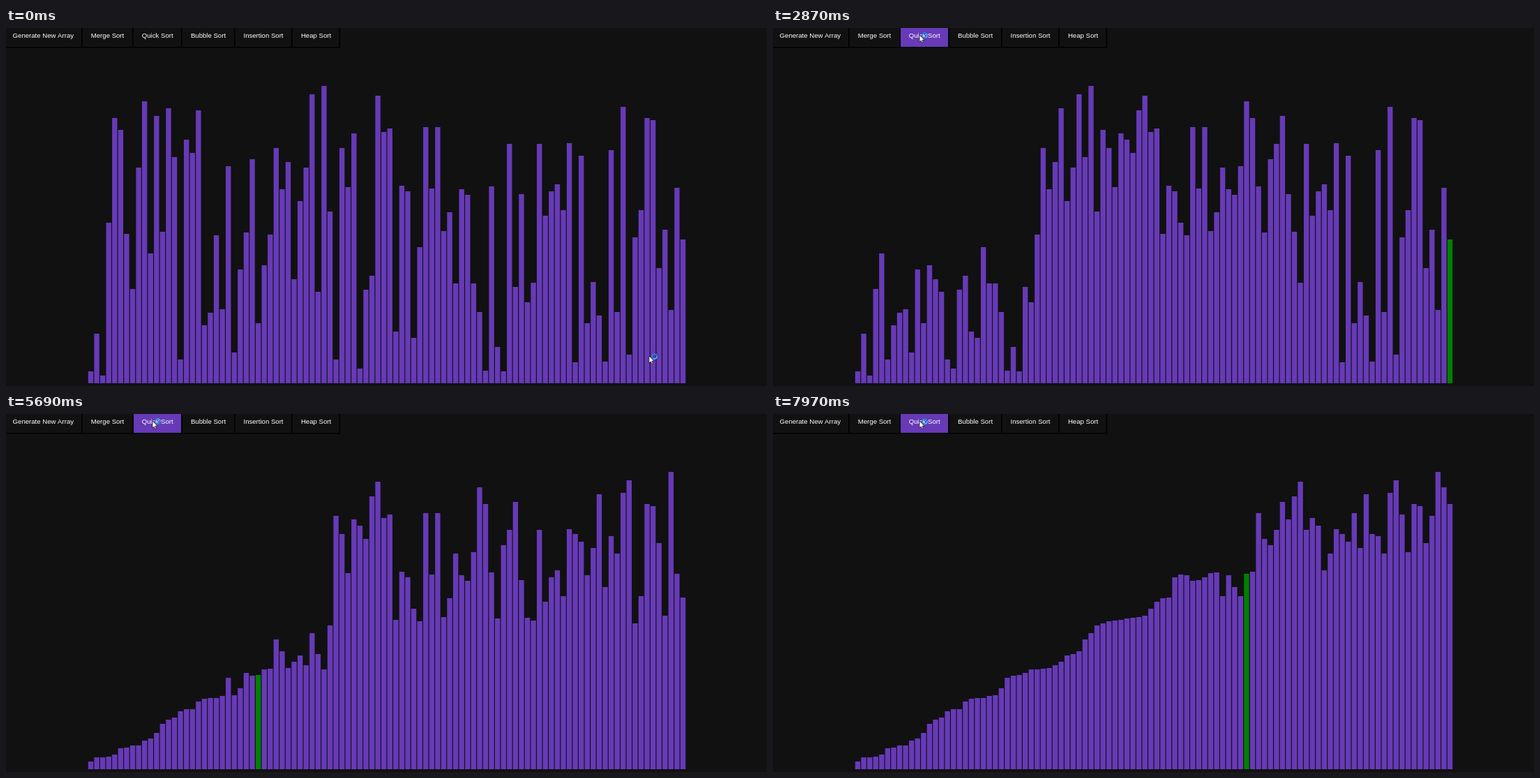
Animation of 1091x513 px, one loop 8 s. Source, as an HTML page with a canvas:

```html
<!DOCTYPE html>
<html lang="en">
<head>
<meta charset="utf-8">
<title>Quick sort</title>
<style>
html, body { margin: 0; width: 100%; height: 100%; overflow: hidden; background: #111; }
canvas { display: block; }
</style>
</head>
<body>
<canvas width="1091" height="513"></canvas>
<script>
const ctx = document.querySelector('canvas').getContext('2d');
const LOOP = 8000, FLOOR = 509, PURPLE = '#673ab7';

// Top edge of each bar before sorting
const tops = [
  492, 438, 498, 279, 129, 146, 295, 374, 200, 105, 323, 126, 292, 115, 185, 475, 160, 179, 118, 426,
  408, 297, 403, 198, 465, 346, 293, 188, 423, 340, 296, 172, 231, 192, 360, 248, 200, 95, 378, 83,
  263, 475, 172, 228, 151, 488, 375, 355, 97, 149, 144, 435, 226, 234, 444, 314, 142, 230, 142, 291,
  264, 366, 231, 239, 366, 407, 491, 227, 457, 492, 166, 371, 238, 393, 365, 166, 269, 234, 224, 261,
  165, 479, 183, 423, 364, 412, 478, 175, 407, 113, 468, 300, 261, 129, 132, 344, 289, 404, 229, 303
];

const buttons = [
  ['Generate New Array', 0, 108, 53.3],
  ['Merge Sort', 110, 181, 145.5],
  ['Quick Sort', 183, 251, 217.2],
  ['Bubble Sort', 253, 327, 290],
  ['Insertion Sort', 329, 409, 369],
  ['Heap Sort', 411, 477.5, 444.5]
];

const swap = (list, a, b) => { [list[a], list[b]] = [list[b], list[a]]; };

// Every swap of a last-pivot quick sort, in order
const swaps = [];
function quickSort(list, lo, hi) {
  if (lo >= hi) return;
  let i = lo;
  const step = (j, last) => {
    swaps.push({ a: i, b: j, pivot: hi, last });
    swap(list, i, j);
  };
  for (let j = lo; j < hi; j++) {
    if (list[j] > list[hi]) { step(j, false); i++; }
  }
  step(hi, true);
  quickSort(list, lo, i - 1);
  quickSort(list, i + 1, hi);
}
quickSort([...tops], 0, tops.length - 1);

// [time, swaps made]
const pace = [[1990, 0], [2870, 29.75], [3330, 46.25], [4710, 92.75], [6560, 152.75], [7970, 199.75], [8000, 200.75]];
// [time, x, y]
const path = [[0, 922, 470], [870, 220, 27], [1100, 210, 10]];

const smooth = p => p * p * (3 - 2 * p);

function along(keys, t, ease = p => p) {
  if (t <= keys[0][0]) return keys[0].slice(1);
  const n = keys.findIndex(k => k[0] > t);
  if (n < 0) return keys[keys.length - 1].slice(1);
  const from = keys[n - 1], to = keys[n];
  const p = ease((t - from[0]) / (to[0] - from[0]));
  return from.slice(1).map((v, i) => v + (to[i + 1] - v) * p);
}

function rect(color, x, y, w, h) {
  ctx.fillStyle = color;
  ctx.fillRect(x, y, w, h);
}

function drawButtons(hover) {
  ctx.font = '9.6px "Liberation Sans", Arial, sans-serif';
  ctx.textAlign = 'center';
  for (const [label, left, right, middle] of buttons) {
    rect('#000', left, 0, right - left + 1.6, 28.4);
    rect(hover && label === 'Quick Sort' ? PURPLE : '#111', left, 0, right - left, 27);
    ctx.fillStyle = '#fff';
    ctx.fillText(label, middle, 14.4);
  }
}

function drawBars(t) {
  const bars = [...tops], colors = {};
  if (t >= pace[0][0]) {
    const [progress] = along(pace, t);
    const index = Math.floor(progress);
    const { a, b, pivot, last } = swaps[index];
    const swapped = progress - index >= 0.5;
    swaps.slice(0, index + swapped).forEach(s => swap(bars, s.a, s.b));
    if (!swapped) colors[a] = colors[b] = '#f00';
    if (!(last && swapped)) colors[pivot] = '#008000';
  }
  bars.forEach((top, i) => rect(colors[i] || PURPLE, 117.8 + i * 8.576, top, 7.4, FLOOR - top));
}

function drawCursor(x, y, t) {
  ctx.save();
  ctx.translate(x, y);
  ctx.fillStyle = '#fff';
  ctx.strokeStyle = '#000';
  ctx.lineWidth = 0.6;
  ctx.fill(arrow);
  ctx.stroke(arrow);
  const turn = t / 1000 * 2 * Math.PI;
  const ring = (color, start, end) => {
    ctx.strokeStyle = color;
    ctx.lineWidth = 1.7;
    ctx.beginPath();
    ctx.arc(7.5, 0.7, 3.5, start, end);
    ctx.stroke();
  };
  ring('#1f86d2', 0, 2 * Math.PI);
  ring('#45b4ee', turn, turn + 2);
  ctx.restore();
}
const arrow = new Path2D('M0 0V10L2.3 7.9L3.8 11.2L5.3 10.5L3.9 7.3H7Z');

function draw() {
  const t = performance.now() % LOOP;
  const [x, y] = along(path, t, smooth);
  rect('#111', 0, 0, 1091, 513);
  drawButtons(y < 27);
  drawBars(t);
  drawCursor(x, y, t);
  requestAnimationFrame(draw);
}
draw();
</script>
</body>
</html>
```
